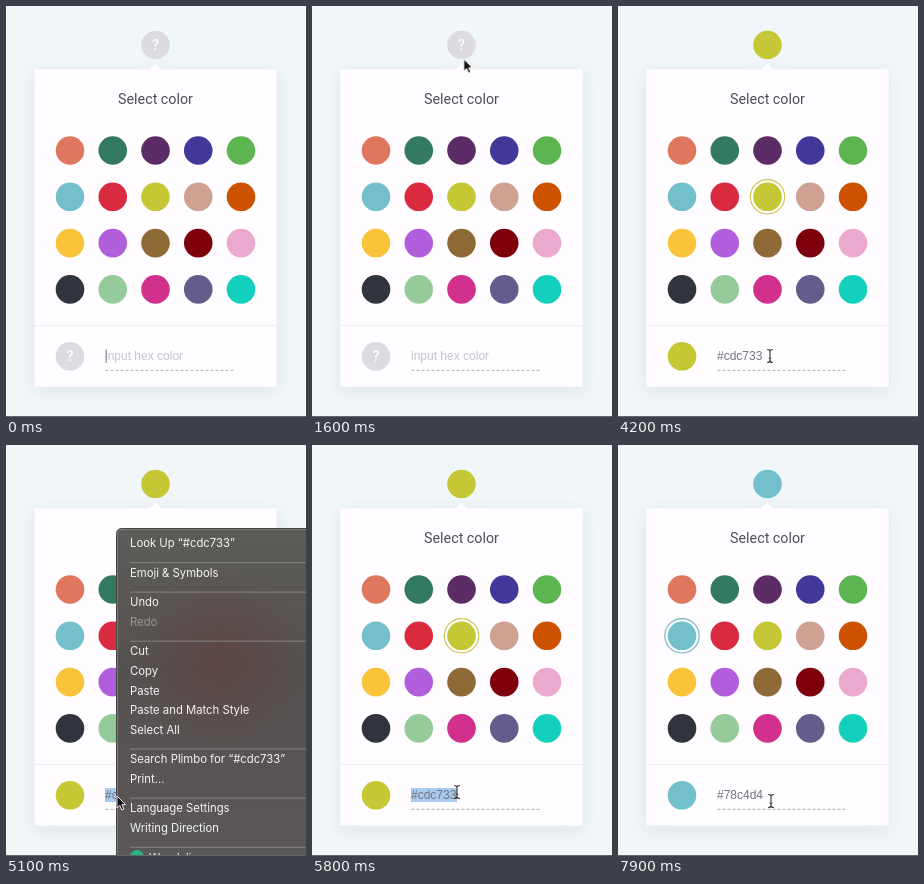
An HTML page for the animation above (8000 ms loop, 300 px wide and 411 px high).

```html
<!DOCTYPE html>
<html lang="en">
<head>
<meta charset="utf-8">
<title>Color picker</title>
<style>
html, body { margin: 0; width: 100%; height: 100%; overflow: hidden; background: #f1f7f8; }
svg { display: block; width: 300px; height: 411px; }
.roboto { font-family: Roboto, sans-serif; text-anchor: middle; }
.field { font: 12px "Liberation Sans", Arial, sans-serif; fill: #74747a; }
.menu-text { font: 11.3px Inter, sans-serif; fill: #f6f5f5; }
.mark { font-size: 14px; font-weight: 500; fill: #fff; }
.tip text { font-size: 10px; font-weight: 500; fill: #fff; }
.tip path { fill: #17212b; }
.ring { fill: none; stroke-width: 1.1; }

/* One loop is 8 s, so 1% is 80 ms */
.a { animation: 8s linear infinite; }
.step { animation-timing-function: step-end; }

#panel { animation-name: panel; }
@keyframes panel { 0%, 6.5% { opacity: 1 } 11%, 16.25% { opacity: 0 } 20%, 100% { opacity: 1 } }
#caret { animation-name: caret; }
@keyframes caret { 0% { opacity: 1 } 2.5%, 100% { opacity: 0 } }

.chosen { animation-name: chosen; }
@keyframes chosen {
  0%, 40% { fill: #dcdbdf } 42.5%, 87.5% { fill: #c5c834 } 90%, 100% { fill: #73c0cc }
}
.mark { animation-name: mark; }
@keyframes mark { 0%, 40% { opacity: 1 } 42.5%, 100% { opacity: 0 } }
#ring-a { animation-name: ring-a; }
@keyframes ring-a { 0%, 40% { opacity: 0 } 42.5%, 87.5% { opacity: 1 } 90%, 100% { opacity: 0 } }
#ring-b { animation-name: ring-b; }
@keyframes ring-b { 0%, 87.5% { opacity: 0 } 90%, 100% { opacity: 1 } }

#hint { animation-name: hint; }
@keyframes hint { 0% { opacity: 1 } 40%, 100% { opacity: 0 } }
#value-a { animation-name: value-a; }
@keyframes value-a { 0% { opacity: 0 } 40% { opacity: 1 } 87.5%, 100% { opacity: 0 } }
#value-b { animation-name: value-b; }
@keyframes value-b { 0% { opacity: 0 } 87.5%, 100% { opacity: 1 } }

#selection { transform-origin: 145px 350px; animation-name: selection; }
@keyframes selection {
  0%, 53.75% { transform: scaleX(0) } 57.5%, 80% { transform: scaleX(1) }
  80.01%, 100% { transform: scaleX(0) }
}

#tip-a { animation-name: tip-a; }
@keyframes tip-a { 0%, 28% { opacity: 0 } 29.4%, 31.5% { opacity: 1 } 33.1%, 100% { opacity: 0 } }
#tip-b { animation-name: tip-b; }
@keyframes tip-b { 0%, 34.4% { opacity: 0 } 35.6%, 46% { opacity: 1 } 47.5%, 100% { opacity: 0 } }
#tip-c { animation-name: tip-c; }
@keyframes tip-c { 0%, 84.4% { opacity: 0 } 85.6%, 92.9% { opacity: 1 } 94.4%, 100% { opacity: 0 } }

#menu { animation-name: menu; }
@keyframes menu { 0% { opacity: 0 } 61.25% { opacity: 1 } 71.25%, 100% { opacity: 0 } }

#pointer { animation-name: pointer; animation-timing-function: ease-in-out; }
@keyframes pointer {
  0%, 18.75% { transform: translate(149px, 40px) }
  23.75% { transform: translate(170px, 140px) }
  28.75% { transform: translate(188px, 192px) }
  31.25% { transform: translate(174px, 199px) }
  35%, 45% { transform: translate(152px, 195px) }
  46.875% { transform: translate(171px, 215px); animation-timing-function: linear }
  49.375% { transform: translate(171px, 300px) }
  51.875%, 53.75% { transform: translate(152px, 350px) }
  57.5% { transform: translate(99px, 350px) }
  60%, 65% { transform: translate(111px, 351px) }
  68.75%, 71.25% { transform: translate(136px, 227px) }
  72.5%, 78.75% { transform: translate(145px, 347px) }
  81.25% { transform: translate(86px, 305px); animation-timing-function: linear }
  83.75% { transform: translate(86px, 210px) }
  85%, 92.5% { transform: translate(64px, 194px) }
  94.375% { transform: translate(86px, 215px); animation-timing-function: linear }
  96.25% { transform: translate(86px, 300px) }
  98.125%, 100% { transform: translate(153px, 356px) }
}
#pointer-fade { animation-name: pointer-fade; }
@keyframes pointer-fade { 0%, 6.5% { opacity: 0 } 11%, 100% { opacity: 1 } }
#hand { animation-name: hand; }
@keyframes hand {
  0% { opacity: 1 } 18.5% { opacity: 0 } 28% { opacity: 1 } 30.5% { opacity: 0 }
  34% { opacity: 1 } 46% { opacity: 0 } 84% { opacity: 1 } 93%, 100% { opacity: 0 }
}
#arrow { animation-name: arrow; }
@keyframes arrow {
  0% { opacity: 0 } 18.5% { opacity: 1 } 28% { opacity: 0 } 30.5% { opacity: 1 }
  34% { opacity: 0 } 46% { opacity: 1 } 50.6% { opacity: 0 } 60.6% { opacity: 1 }
  72.2% { opacity: 0 } 80% { opacity: 1 } 84% { opacity: 0 } 93% { opacity: 1 }
  97%, 100% { opacity: 0 }
}
#beam { animation-name: beam; }
@keyframes beam {
  0% { opacity: 0 } 50.6% { opacity: 1 } 60.6% { opacity: 0 } 72.2% { opacity: 1 }
  80% { opacity: 0 } 97%, 100% { opacity: 1 }
}
</style>
</head>
<body>
<svg viewBox="0 0 300 411">
  <defs>
    <filter id="shadow" x="-20%" y="-20%" width="140%" height="140%">
      <feDropShadow dx="0" dy="4" stdDeviation="8" flood-color="#345" flood-opacity=".09"/>
    </filter>
    <linearGradient id="glass" x1="0" y1="0" x2="0" y2="1">
      <stop offset="0" stop-color="#5d5c59"/>
      <stop offset=".4" stop-color="#555150"/>
      <stop offset="1" stop-color="#5b5858"/>
    </linearGradient>
    <radialGradient id="tint">
      <stop offset="0" stop-color="#67302c" stop-opacity=".35"/>
      <stop offset="1" stop-color="#67302c" stop-opacity="0"/>
    </radialGradient>
  </defs>

  <rect width="300" height="411" fill="#f1f7f8"/>
  <circle class="a chosen" cx="149.5" cy="39" r="14.3"/>
  <text class="a roboto mark" x="149.5" y="44">?</text>

  <g id="panel" class="a">
    <path d="M28.5 63.5H143.5L149.5 57.5L155.5 63.5H270.5V380.5H28.5Z" fill="#fffdff" filter="url(#shadow)"/>
    <text class="roboto" x="149.5" y="98" font-size="14.3" fill="#4c4f55">Select color</text>
    <g id="swatches"></g>
    <circle id="ring-a" class="a ring" cx="149.5" cy="190.8" r="17.2" stroke="#c9c64c"/>
    <circle id="ring-b" class="a ring" cx="64" cy="190.8" r="17.2" stroke="#73b4bf"/>
    <path d="M28.5 319.5H270.5" stroke="#eeeef1"/>
    <circle class="a chosen" cx="64" cy="350.3" r="14.3"/>
    <text class="a roboto mark" x="64" y="355.3">?</text>
    <rect id="selection" class="a" x="99" y="343" width="46" height="14" fill="#a9cbef"/>
    <text id="hint" class="a step field" x="99" y="354" style="fill:#c5c4c9">input hex color</text>
    <text id="value-a" class="a step field" x="99" y="354">#cdc733</text>
    <text id="value-b" class="a step field" x="99" y="354">#78c4d4</text>
    <path id="caret" class="a step" d="M100.2 343.5V357" stroke="#77777c"/>
    <path d="M99.5 364.3H229" stroke="#aaa9af" stroke-dasharray="3 2"/>
    <g id="tips"></g>
  </g>

  <g id="menu" class="a step">
    <rect x="110.5" y="83.5" width="210" height="350" rx="5" fill="url(#glass)" stroke="#454443"/>
    <ellipse cx="215" cy="215" rx="85" ry="90" fill="url(#tint)"/>
    <path d="M111.5 420V89Q111.5 84.5 116 84.5H300" fill="none" stroke="#858381" stroke-width=".8"/>
    <g id="items"></g>
    <circle cx="131" cy="412" r="7" fill="#27b584"/>
  </g>

  <path d="M0 410.5H300" stroke="#62676a"/>

  <g id="pointer" class="a">
    <g id="pointer-fade" class="a">
      <path id="hand" class="a step" fill="#fff" stroke="#222" stroke-width="1" stroke-linejoin="round"
        d="M-1 .8Q.5 -1 1.7 1L3 5Q4.3 3.8 5.2 5.2Q6.6 4.5 7.3 6Q9 5.6 9.3 7.5V10.5L8 13.5H2.2L-.6 10L-3 7.4Q-3 5.8 -1.2 6.3L.6 7.5Z"/>
      <path id="arrow" class="a step" d="M0 0V12L2.8 9.4L4.8 14L6.9 13.1L4.9 8.6H8.6Z"
        fill="#111" stroke="#fff" stroke-width=".9" stroke-linejoin="round"/>
      <path id="beam" class="a step" d="M-2.8 -6.5Q0 -6.5 0 -4.5V4.5Q0 6.5 -2.8 6.5M2.8 -6.5Q0 -6.5 0 -4.5V4.5Q0 6.5 2.8 6.5M-1.3 2.2H1.3"
        fill="none" stroke="#333" stroke-width="1.1"/>
    </g>
  </g>
</svg>
<script>
const fill = (id, parts) => { document.getElementById(id).innerHTML = parts.join(''); };

const colors = [
  'df775f', '337a61', '5b2c65', '41389a', '5db551',
  '73c0cc', 'da2a3f', 'c5c834', 'cfa192', 'cc5200',
  'f9c33a', 'b05edb', '8e6a37', '7f000d', 'eba9cf',
  '31343d', '95cb9a', 'd1318c', '665c8c', '12d0bb'
];
fill('swatches', colors.map((c, i) => {
  const x = 64 + i % 5 * 42.75, y = 144.5 + Math.floor(i / 5) * 46.3;
  return `<circle cx="${x}" cy="${y}" r="14.3" fill="#${c}"/>`;
}));

const tips = [['a', 192, '#d8ac9c'], ['b', 149.5, '#cdc733'], ['c', 64, '#78c4d4']];
fill('tips', tips.map(([id, x, label]) =>
  `<g id="tip-${id}" class="a tip"><path d="M${x} 213l5 5h20q2 0 2 2v16q0 2 -2 2h-50q-2 0 -2 -2v-16q0 -2 2 -2h20z"/>
  <text class="roboto" x="${x}" y="231.5">${label}</text></g>`));

// An empty entry is a divider
const items = ['Look Up “#cdc733”', '', 'Emoji &amp; Symbols', '', 'Undo', 'Redo', '', 'Cut', 'Copy',
  'Paste', 'Paste and Match Style', 'Select All', '', 'Search Plimbo for “#cdc733”', 'Print…', '',
  'Language Settings', 'Writing Direction', '', 'Wendalix'];
let y = 102.3;
fill('items', items.map(label => {
  if (!label) {
    y += 9.9;
    return `<path d="M124 ${y - 14.2}H300" stroke="#858281"/>`;
  }
  const x = label === 'Wendalix' ? 143 : 124;
  const text = `<text class="menu-text" x="${x}" y="${y}"${label === 'Redo' ? ' opacity=".4"' : ''}>${label}</text>`;
  y += 19.6;
  return text;
}));
</script>
</body>
</html>
```
